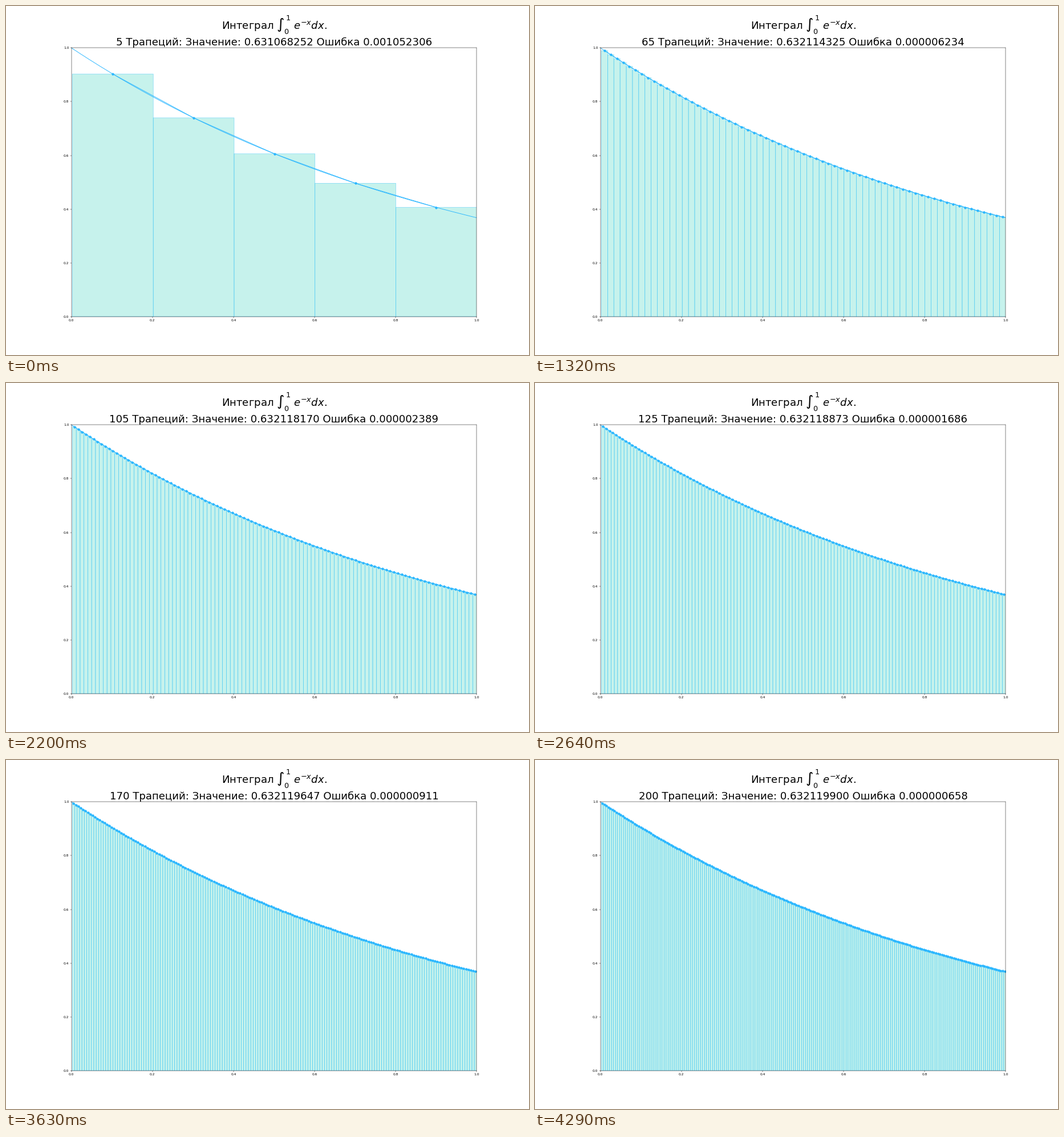
A matplotlib script that plays this animation: 917x611 px, repeating every 4400 ms.

```python
import numpy as np
import matplotlib.pyplot as plt
from matplotlib.animation import FuncAnimation
from matplotlib.collections import PolyCollection

W, H = 917, 611
DPI = W / 21
STEPS, STEP_MS = 40, 110
START = 0.0025  # left edge of the first bar
EXACT = 1 - np.exp(-1)

LINE = "#29b6ff"
FILL = (68 / 255, 212 / 255, 195 / 255, 0.3)
EDGE = (31 / 255, 188 / 255, 250 / 255, 0.6)


def f(x):
    return np.exp(-x)


def midpoints(a, n):
    """Centres of n equal intervals on [a, 1] and their width."""
    h = (1 - a) / n
    return a + h * (np.arange(n) + 0.5), h


def bar_corners(x, y, h):
    left, right, zero = x - h / 2, x + h / 2, np.zeros_like(x)
    xs = np.stack([left, left, right, right], axis=1)
    ys = np.stack([zero, y, y, zero], axis=1)
    return np.stack([xs, ys], axis=2)


def caption(n):
    x, h = midpoints(0, n)
    value = h * f(x).sum()
    return (
        "Интеграл $\\int_0^1\\ e^{-x}dx$.\n"
        f"{n} Трапеций: Значение: {value:.9f} Ошибка {abs(EXACT - value):.9f}"
    )


plt.rcParams["font.family"] = "DejaVu Sans"
fig, ax = plt.subplots(figsize=(W / DPI, (H + 0.01) / DPI), dpi=DPI)
ax.set(xlim=(0, 1), ylim=(0, 1))

bars = PolyCollection([], facecolors=[FILL], edgecolors=[EDGE], linewidths=1)
bars.set_snap(False)
ax.add_collection(bars, autolim=False)

grid = np.linspace(0, 1, 201)
ax.plot(grid, f(grid), color=LINE, lw=1.5)
(nodes,) = ax.plot([], [], "o-", color=LINE, lw=1.5, ms=6)
title = ax.set_title("", fontsize=30)


def update(i):
    n = 5 * (i + 1)
    x, h = midpoints(START, n)
    bars.set_verts(bar_corners(x, f(x), h))
    nodes.set_data(x, f(x))
    title.set_text(caption(n))
    return bars, nodes, title


anim = FuncAnimation(fig, update, frames=STEPS, interval=STEP_MS,
                     repeat=True, repeat_delay=0, blit=False)
plt.show()
```
